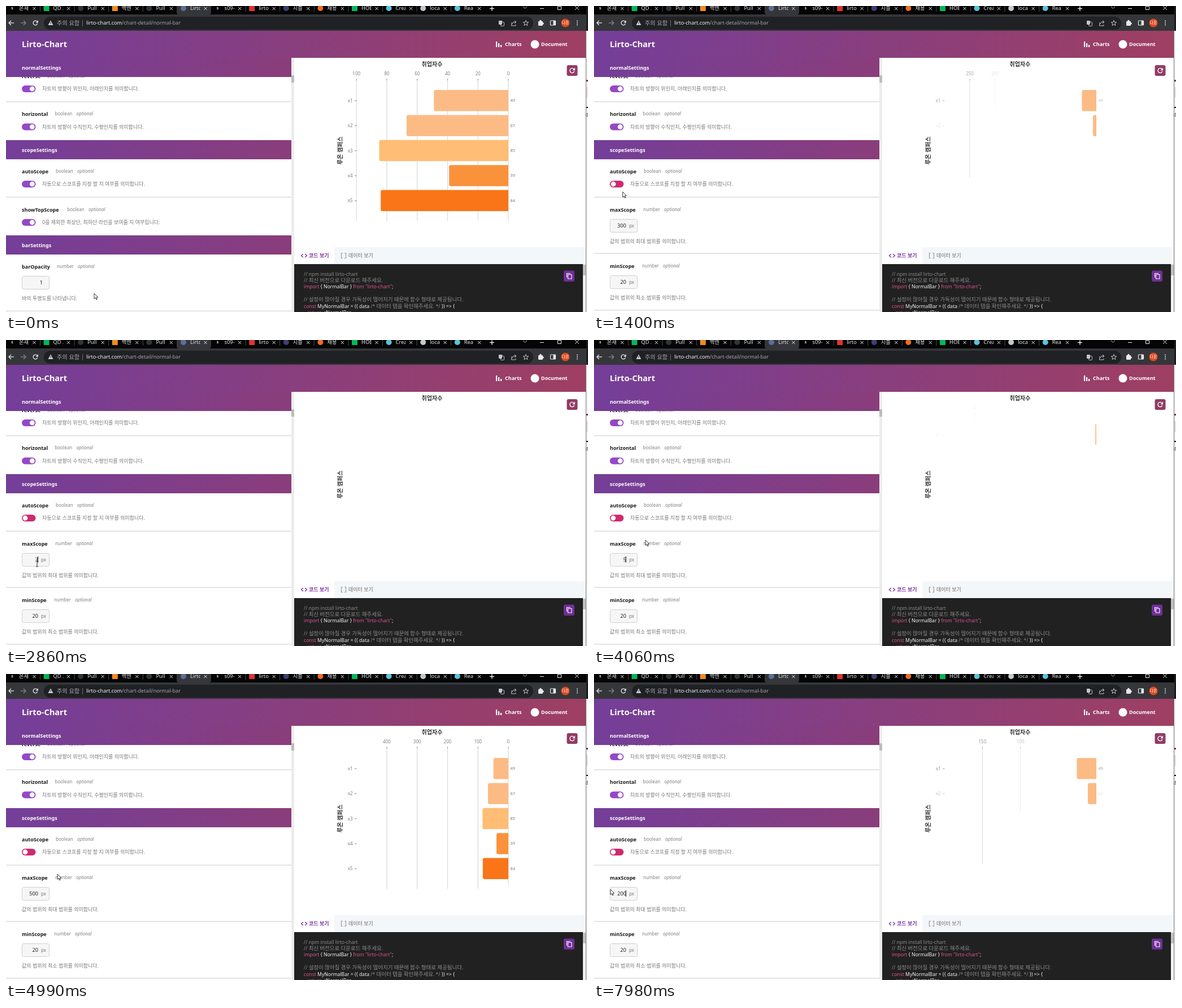
Write an HTML page with a canvas that moves like this. It is 1030x543 px and loops after 8000 ms.

```html
<!DOCTYPE html>
<html lang="ko">
<head>
<meta charset="utf-8">
<title>Chart settings</title>
<style>
html, body { margin: 0; width: 100%; height: 100%; overflow: hidden; background: #fff; }
canvas { display: block; }
</style>
</head>
<body>
<canvas id="stage" width="1030" height="543"></canvas>
<script>
const c = document.getElementById('stage').getContext('2d');
const LOOP = 8000, TOGGLE_AT = 1238, FOCUS_AT = 2000, BLINK = 530;
const FONT = '"Noto Sans", "Noto Sans CJK KR", "Noto Sans CJK", sans-serif';
const PURPLE = '#9448c6';

// ---------- helpers ----------
const clamp = (v, a = 0, b = 1) => Math.max(a, Math.min(b, v));

// cubic-bezier(.25, .1, .25, 1)
function ease(u) {
  if (u <= 0) return 0;
  if (u >= 1) return 1;
  let lo = 0, hi = 1, s = u;
  for (let i = 0; i < 18; i++) {
    s = (lo + hi) / 2;
    const x = .75 * s * (1 - s) + s * s * s;
    if (x < u) lo = s; else hi = s;
  }
  return .3 * s * (1 - s) * (1 - s) + 3 * s * s * (1 - s) + s * s * s;
}

function rect(x, y, w, h, fill, r = 0) {
  c.fillStyle = fill;
  c.beginPath();
  c.roundRect(x, y, w, h, r);
  c.fill();
}

function disc(x, y, r, fill) {
  c.fillStyle = fill;
  c.beginPath();
  c.arc(x, y, r, 0, 7);
  c.fill();
}

function line(color, width, ...pts) {
  c.strokeStyle = color;
  c.lineWidth = width;
  c.beginPath();
  for (let i = 0; i < pts.length; i += 2) c.lineTo(pts[i], pts[i + 1]);
  c.stroke();
}

function box(x, y, w, h, color, r = 0, width = 1) {
  c.strokeStyle = color;
  c.lineWidth = width;
  c.beginPath();
  c.roundRect(x, y, w, h, r);
  c.stroke();
}

// y is the optical centre of the line
function text(s, x, y, size, color, style = '', align = 'left') {
  c.font = `${style} ${size}px ${FONT}`;
  c.fillStyle = color;
  c.textAlign = align;
  c.fillText(s, x, y + size * .36);
  return c.measureText(s).width;
}

function grad(x0, y0, x1, y1, a, b) {
  const g = c.createLinearGradient(x0, y0, x1, y1);
  g.addColorStop(0, a);
  g.addColorStop(1, b);
  return g;
}

function cross(x, y, r, color) {
  line(color, 1, x - r, y - r, x + r, y + r);
  line(color, 1, x - r, y + r, x + r, y - r);
}

function spin(x, y, r, color) {
  c.strokeStyle = color;
  c.lineWidth = 1.4;
  c.beginPath();
  c.arc(x, y, r, .3, 5.5);
  c.stroke();
  c.fillStyle = color;
  c.beginPath();
  c.moveTo(x + r + 1, y - r - 1);
  c.lineTo(x + r + 1, y - .3);
  c.lineTo(x + .6, y - .3);
  c.fill();
}

// ---------- browser ----------
const TABS = [
  ['온새', ''], ['QD 그', '#03b75a'], ['Pull', '#30353a'], ['백엔', '#f08a24'], ['Pull', '#30353a'],
  ['Lirto', '#5c6f9c'], ['s09-', ''], ['lirto', '#e0342f'], ['시블', '#3c3f78'], ['채용', '#f26b21'],
  ['HOB', '#03b75a'], ['Crea', '#58c4dc'], ['loca', '#c4c7cb'], ['Rea', '#58c4dc']
];

function browser() {
  rect(0, 0, 1027, 16, '#050505');
  rect(302, -6, 61, 22, '#35363a', 5);
  rect(0, 15, 1027, 29, '#35363a');
  TABS.forEach(([name, color], i) => {
    const x = 11 + i * 60.6;
    if (!color) text('s', x, 3, 7, '#ddd', 'bold', 'center');
    else if ([1, 3, 7, 10].includes(i)) rect(x - 5, -1, 10, 10, color, 1);
    else disc(x, 4, 5, color);
    c.save();
    c.beginPath();
    c.rect(x + 11, 0, 19, 15);
    c.clip();
    text(name, x + 12, 4, 9.3, '#e4e5e8');
    c.restore();
    cross(x + 39, 4.5, 2.6, '#e8eaed');
    if (i < 13 && i !== 4 && i !== 5) line('#4a4c50', 1, x + 49.5, 0, x + 49.5, 10);
  });
  line('#fff', 1.3, 856, 4.5, 864, 4.5);
  line('#fff', 1.3, 860, .5, 860, 8.5);
  line('#bbb', 1, 915, 1, 918.5, 4.5, 922, 1);
  line('#eee', 1, 945, 4.5, 952, 4.5);
  box(976.5, .5, 6, 6, '#eee');
  cross(1010.5, 3.5, 3.3, '#eee');

  line('#e8eaed', 1.3, 14, 30, 5, 30);
  line('#e8eaed', 1.3, 9, 26, 5, 30, 9, 34);
  line('#85878b', 1.3, 26, 30, 35, 30);
  line('#85878b', 1.3, 31, 26, 35, 30, 31, 34);
  spin(52, 30, 3.8, '#e8eaed');

  rect(67, 19, 866, 23, '#202124', 11.5);
  c.fillStyle = '#c8cacd';
  c.beginPath();
  c.moveTo(79, 25.5);
  c.lineTo(83.5, 34);
  c.lineTo(74.5, 34);
  c.fill();
  line('#202124', 1, 79, 28.5, 79, 31.3);
  text('주의 요함', 90, 30, 10.2, '#a9acb1');
  line('#6a6d72', 1, 135.5, 25, 135.5, 36);
  const w = text('lirto-chart.com', 142, 30, 9.1, '#f2f3f5');
  text('/chart-detail/normal-bar', 142 + w, 30, 9.1, '#a2a5aa');

  const ink = '#c3c6ca';
  rect(872, 26, 6, 7, ink, 1);
  box(875.5, 28.5, 6, 7, ink, 1);
  line(ink, 1, 895, 29, 894.5, 35, 902, 35, 902, 33);
  line(ink, 1, 896, 32, 898, 28.5, 903, 28.5);
  line(ink, 1, 900, 26, 903, 28.5, 900, 31);
  c.beginPath();
  for (let i = 0; i <= 10; i++) {
    const r = i % 2 ? 2.1 : 5, a = i * Math.PI / 5 - Math.PI / 2;
    c.lineTo(920 + r * Math.cos(a), 30.5 + r * Math.sin(a));
  }
  c.stroke();
  rect(942, 27, 8, 8, '#e8eaed', 1);
  disc(946, 26.5, 1.7, '#e8eaed');
  disc(950.2, 31, 1.7, '#e8eaed');
  box(963.5, 26, 9, 8, '#e8eaed', 1, 1.2);
  rect(968.5, 26, 4.5, 8, '#e8eaed');
  disc(990, 30, 7.5, '#e04a1f');
  text('다온', 990, 30, 6.8, '#fff', '', 'center');
  for (const y of [26.5, 30, 33.5]) disc(1011, y, 1, '#e8eaed');
}

function siteHeader() {
  rect(0, 44, 1026, 82, grad(0, 64, 1026, 106, '#743e99', '#9f3f62'));
  text('Lirto-Chart', 28, 68, 14.6, '#fff', 'bold');
  rect(867, 63, 2.2, 10, '#fff');
  rect(871, 66, 2.2, 7, '#fff');
  rect(875, 69, 2.2, 4, '#fff');
  text('Charts', 883, 68, 9, '#fff', 'bold');
  disc(936, 68, 7.5, '#fff');
  text('Document', 947, 68, 9, '#fff', 'bold');
}

// ---------- settings ----------
function section(name, y, h = 34) {
  rect(0, y, 505, h, grad(0, y, 505, y + 12, '#743e99', '#8a3d7b'));
  text(name, 28, y + h / 2 + .5, 9, '#fff', 'bold');
}

function heading(name, y, type, x) {
  text(name, 28, y, 9, '#1b1b1b', 'bold');
  text(type, x, y - .5, 8, '#808080');
  text('optional', x + (type === 'boolean' ? 38 : 37), y - .5, 8, '#808080', 'italic');
}

function toggle(y, label, off = 0) {
  rect(28, y - 6, 24.5, 12, off > .5 ? '#cf2a70' : PURPLE, 6);
  disc(46.3 - off * 12.3, y, 4.4, '#fff');
  text(label, 64, y, 9, '#777');
}

function field(y, value, unit) {
  rect(28.5, y - 11.5, 48, 23, '#f6f6f6', 3);
  box(28.5, y - 11.5, 48, 23, '#cfcfcf', 3);
  text(value, unit ? 57 : 65, y, 9.2, '#222', '', 'right');
  if (unit) text(unit, 62, y, 8, '#777');
}

const rule = y => rect(0, y - 1, 505, 1.5, '#dcdcdc');

function settings(t, value, keyAt) {
  const off = t >= TOGGLE_AT;
  rect(0, 125, 505, 418, '#fff');
  heading('reverse', 125, 'boolean', 73);
  toggle(147, '차트의 방향이 위인지, 아래인지를 의미합니다.');
  rule(170);
  heading('horizontal', 192, 'boolean', 86.5);
  toggle(214.5, '차트의 방향이 수직인지, 수평인지를 의미합니다.');
  section('scopeSettings', 238);
  heading('autoScope', 294, 'boolean', 88);
  toggle(316, '자동으로 스코프를 지정 할 지 여부를 의미합니다.', ease((t - TOGGLE_AT) / 200));
  rule(339.5);
  if (off) {
    heading('maxScope', 362, 'number', 87);
    field(390, value, 'px');
    selection(t, value);
    const caret = t >= FOCUS_AT && !(t >= 6620 && t < 7520);
    const since = t - Math.max(keyAt, FOCUS_AT);
    if (caret && Math.floor(since / BLINK) % 2 === 0) line('#111', 1, 56.5, 384, 56.5, 395);
    text('값의 범위의 최대 범위를 의미합니다.', 28, 418, 9, '#777');
    rule(439.5);
    heading('minScope', 461.5, 'number', 85);
    field(490, '20', 'px');
    text('값의 범위의 최소 범위를 의미합니다.', 28, 517.5, 9, '#777');
    rule(540);
  } else {
    heading('showTopScope', 362, 'boolean', 108);
    toggle(384, '0을 제외한 최상단, 최하단 라인을 보여줄 지 여부입니다.');
    section('barSettings', 407);
    heading('barOpacity', 463, 'number', 90);
    field(491, '1');
    text('바의 투명도를 나타냅니다.', 28, 519, 9, '#777');
    rule(541.5);
  }
  section('normalSettings', 92);
}

function selection(t, value) {
  if (t < 6655 || t >= 7520) return;
  const part = value.slice(t < 6790 ? 1 : 0);
  c.font = `9.2px ${FONT}`;
  const w = c.measureText(part).width;
  rect(57 - w, 384, w, 12, '#2c66b8');
  text(part, 57, 390, 9.2, '#fff', '', 'right');
}

// ---------- chart ----------
const DATA = [49, 67, 85, 39, 84];
const FILLS = ['#fcbb84', '#fcbb84', '#ffbd75', '#fa923c', '#f97518'];
const ZERO = 889, SPAN = 268.8, DUR = 400, STAGGER = 100;
const PARTS = { 1: 5, 2: 4, 3: 6, 5: 5 };

function chart(age, max, showTop) {
  text('취업자수', 754, 103.5, 10, '#333', 'bold', 'center');
  c.save();
  c.translate(591.5, 256.5);
  c.rotate(-Math.PI / 2);
  text('루온 캠퍼스', 0, 0, 10.3, '#333', 'bold', 'center');
  c.restore();
  if (!max) return;

  const n = PARTS[String(max)[0]], first = showTop ? n : n - 1;
  for (let k = first; k >= 0; k--) {
    const p = ease((age - (first - k) * STAGGER) / DUR);
    if (!p) continue;
    const x = ZERO - SPAN * k / n;
    c.globalAlpha = p;
    text(String(max * k / n), x, 120.5, 8, '#808080', '', 'center');
    line('#dadada', 1.2, x, 131, x, 131 + 250 * p);
    line('#8c8c8c', 1, x, 129, x, 132);
  }
  DATA.forEach((v, i) => {
    const u = (age - i * STAGGER) / DUR, p = ease(u), y = 149 + i * 44.4;
    if (!p) return;
    c.globalAlpha = p;
    text('x' + (i + 1), 613.5, y + 19, 8, '#808080', '', 'right');
    line('#888', 1, 617, y + 19, 620.5, y + 19);
    c.globalAlpha = 1;
    const w = Math.min(SPAN * Math.min(v / max, 1), 78 * Math.max(0, u - .08));
    if (w > 0) rect(ZERO - w, y, w, 37.5, FILLS[i], [Math.min(3, w), 0, 0, Math.min(3, w)]);
    c.globalAlpha = p * p;
    text(String(v), 892.5, y + 18.5, 7.4, '#777');
  });
  c.globalAlpha = 1;
}

// ---------- code ----------
const GREY = '#8b8b8b', PINK = '#e0528f', WHITE = '#f2f2f2';
const CODE = [
  [475.5, '// npm install lirto-chart', GREY],
  [487, '// 최신 버전으로 다운로드 해주세요.', GREY],
  [498, 'import', PINK, ' { NormalBar } ', WHITE, 'from "lirto-chart"', PINK, ';', WHITE],
  [521, '// 설정이 많아질 경우 가독성이 떨어지기 때문에 함수 형태로 제공됩니다.', GREY],
  [533, 'const ', PINK, 'MyNormalBar = ({ data ', WHITE, '/* 데이터 탭을 확인해주세요. */', GREY, ' }) => {', WHITE],
  [544, '   return ', PINK, '<NormalBar', WHITE]
];

function codePanel() {
  rect(581, 428, 445, 30, '#f4f7fa');
  line('#7a2e9e', 1.3, 526, 440, 522.5, 443, 526, 446);
  line('#7a2e9e', 1.3, 529, 440, 532.5, 443, 529, 446);
  text('코드 보기', 536, 443, 9, '#7a2e9e', 'bold');
  line('#999', 1.2, 596, 438.5, 593.5, 438.5, 593.5, 447.5, 596, 447.5);
  line('#999', 1.2, 599, 438.5, 601.5, 438.5, 601.5, 447.5, 599, 447.5);
  text('데이터 보기', 606, 443, 9, '#999', 'bold');

  rect(510, 458, 511, 85, '#212121');
  rect(1021, 458, 5, 85, '#f1f1f1');
  rect(1021, 459, 5, 19, '#c1c1c1');
  for (const [y, ...runs] of CODE) {
    let x = 527;
    for (let i = 0; i < runs.length; i += 2)
      for (const s of runs[i].split(/([가-힣]+)/))
        if (s) x += text(s, x, y, /[가-힣]/.test(s) ? 9.5 : 8.6, runs[i + 1]);
  }
  rect(987, 469.5, 19, 19.5, '#702f96', 3);
  line('#fff', 1.1, 992.5, 482, 992.5, 474.5, 999, 474.5);
  box(994.5, 476.5, 6.5, 7.5, '#fff', 0, 1.1);
}

function rightPanel(age, max, showTop) {
  rect(505, 92, 521, 451, '#fff');
  rect(505, 92, 5, 451, '#ececec');
  rect(505, 123, 5, 13, '#bcbcbc', 1);
  chart(age, max, showTop);
  rect(992.5, 105, 19, 19, '#913b66', 3);
  spin(1002, 114.5, 4, '#fff');
  codePanel();
}

function edge() {
  rect(1026, 0, 4, 543, '#f3f3f3');
  rect(1026, 0, 1, 543, '#777');
  rect(1027, 0, 3, 44, '#1c1c1c');
  rect(1027, 131, 3, 3, '#7d3560');
  rect(1027, 144, 3, 19, '#ead9e2');
  rect(1027, 179, 3, 2, '#111');
  text('d', 1025.5, 193, 9, '#333');
}

// ---------- pointer ----------
const PATH = [
  [70, 156, 510], [860, 50, 317], [1300, 50, 317], [1700, 55, 397], [3260, 55, 397], [3590, 91, 355],
  [5390, 91, 355], [5720, 222, 48], [6120, 56, 392], [6620, 56, 392], [6660, 52, 393], [6990, 29, 382]
];

function pointerAt(t) {
  const i = PATH.findIndex(p => p[0] > t);
  if (i === 0) return PATH[0].slice(1);
  if (i < 0) return PATH[PATH.length - 1].slice(1);
  const [t0, x0, y0] = PATH[i - 1], [t1, x1, y1] = PATH[i];
  const u = clamp((t - t0) / (t1 - t0)), s = u * u * (3 - 2 * u);
  return [x0 + (x1 - x0) * s, y0 + (y1 - y0) * s];
}

function shape(d) {
  const p = new Path2D(d);
  c.fillStyle = '#fff';
  c.fill(p);
  c.strokeStyle = '#222';
  c.lineWidth = .9;
  c.stroke(p);
}

function pointer(t) {
  const [x, y] = pointerAt(t);
  c.save();
  c.translate(x, y);
  if (t > TOGGLE_AT && x > 30 && x < 76 && y > 379 && y < 402) {
    line('#333', 1, -2, -5, 2, -5);
    line('#333', 1, 0, -5, 0, 5);
    line('#333', 1, -2, 5, 2, 5);
  } else if (x > 28 && x < 53 && y > 310 && y < 322) {
    shape('M-1 0Q0-1 1 0V4.5L5 5.5Q6 6 5.5 8L4.5 12H-1L-4 7.5Q-4 6-2.5 6.5L-1 8Z');
  } else {
    shape('M0 0V9.5L2.2 7.5L3.8 11L5.3 10.3L3.8 7H6.8Z');
  }
  c.restore();
}

// ---------- timeline: [time, maxScope as typed] ----------
const EDITS = [
  [-9999, '100'], [TOGGLE_AT, '300'], [2730, '30'], [2860, '3'], [2990, ''],
  [4020, '5'], [4150, '50'], [4274, '500'], [7520, '2'], [7650, '20'], [7772, '200']
];

function draw(t) {
  const [at, value] = EDITS.filter(e => e[0] <= t).pop();
  c.clearRect(0, 0, 1030, 543);
  edge();
  siteHeader();
  settings(t, value, at);
  rightPanel(t - at, Number(value), t < TOGGLE_AT);
  browser();
  pointer(t);
}

const start = performance.now();
function tick() {
  draw((performance.now() - start) % LOOP);
  requestAnimationFrame(tick);
}
tick();
</script>
</body>
</html>
```
